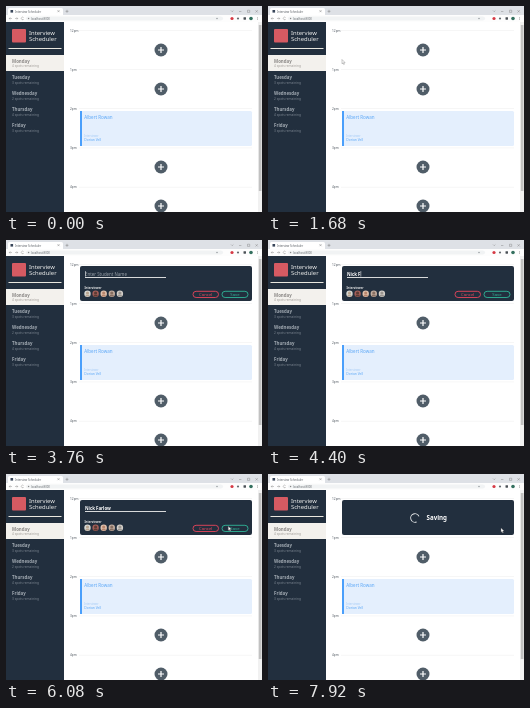
Write an HTML page that moves like this. It is 256 by 206 pixels and loops after 8 s.

```html
<!DOCTYPE html>
<html lang="en">
<head>
<meta charset="utf-8">
<title>Interview Scheduler</title>
<style>
html, body { margin: 0; width: 100%; height: 100%; overflow: hidden; background: #fff; }
svg { display: block; width: 100vw; height: 100vh; font-family: "Noto Sans", "Open Sans", sans-serif; }
</style>
</head>
<body>
<svg id="stage" viewBox="0 0 256 206" xmlns="http://www.w3.org/2000/svg"></svg>
<script>
const NS = "http://www.w3.org/2000/svg";
const stage = document.getElementById("stage");
const DARK = "#222f3e", BLUE = "#5ba7f7";

function add(parent, tag, attrs, text) {
  const el = document.createElementNS(NS, tag);
  for (const k in attrs) el.setAttribute(k, attrs[k]);
  if (text) el.textContent = text;
  parent.appendChild(el);
  return el;
}
const group = (parent = stage) => add(parent, "g", {});
const rect = (p, x, y, width, height, fill, rx = 0) => add(p, "rect", { x, y, width, height, fill, rx });
const dot = (p, cx, cy, r, fill) => add(p, "circle", { cx, cy, r, fill });
const line = (p, d, stroke, width = 0.6) =>
  add(p, "path", { d, stroke, "stroke-width": width, fill: "none" });
const label = (p, x, y, size, fill, str, weight = 400) =>
  add(p, "text", { x, y, "font-size": size, fill, "font-weight": weight }, str);
const show = (el, on) => el.setAttribute("visibility", on ? "visible" : "hidden");

function browser() {
  const g = group();
  rect(g, 0, 0, 256, 10, "#dee1e6");
  rect(g, 2, 2, 55, 9, "#fff", 1.5);
  rect(g, 4.5, 4, 2.6, 2.6, "#39465a");
  label(g, 9, 6.5, 2.8, "#5a5f65", "Interview Scheduler");
  line(g, "M51.5 4.2l2 2m0-2l-2 2", "#666", 0.4);
  line(g, "M59.5 5.3h3m-1.5-1.5v3", "#666", 0.4);
  line(g, "M225 4.5l1.2 1.2 1.2-1.2M233 5.5h2.4M241.5 4.2h2.2v2.2h-2.2zM249.5 4.2l2.3 2.3m0-2.3l-2.3 2.3", "#777", 0.4);
  rect(g, 0, 9, 256, 7, "#fdfdfd");
  line(g, "M6 12.5h-2.8l1.2-1.2m-1.2 1.2l1.2 1.2M9 12.5h2.8l-1.2-1.2m1.2 1.2l-1.2 1.2M17.6 11.6a1.3 1.3 0 1 0 .2 1.4", "#777", 0.4);
  rect(g, 20, 10.4, 197, 4.2, "#f1f3f4", 2.1);
  dot(g, 22.6, 12.5, 0.7, "#888");
  label(g, 25, 13.5, 2.8, "#666b70", "localhost:8000");
  dot(g, 211, 12.5, 0.8, "#9a9fa4");
  dot(g, 226, 12.5, 1.6, "#d63a45");
  dot(g, 232, 12.5, 1.1, "#666c72");
  rect(g, 237.5, 11.2, 2.5, 2.5, "#4b5157", 0.4);
  dot(g, 245, 12.5, 1.8, "#34705f");
  for (const y of [11.3, 12.5, 13.7]) dot(g, 251.5, y, 0.35, "#555");
  rect(g, 252, 16, 4, 190, "#f1f1f1");
  rect(g, 252.8, 19, 2.7, 166, "#c1c1c1");
}

function sidebar() {
  const g = group();
  rect(g, 0, 16, 58, 190, DARK);
  rect(g, 6, 23, 14, 13.5, "#d65a62", 1);
  label(g, 23, 29.2, 5.9, "#f3f3f1", "Interview");
  label(g, 23, 35.4, 5.9, "#f3f3f1", "Scheduler");
  rect(g, 2.5, 42, 53, 1, "#e9e7df");
  rect(g, 0, 49, 58, 16, "#f3f1ed");
  const days = [["Monday", 4], ["Tuesday", 3], ["Wednesday", 2], ["Thursday", 4], ["Friday", 3]];
  days.forEach(([name, spots], i) => {
    const y = 56.8 + i * 16.1;
    label(g, 6, y, 4.4, i ? "#a3abb3" : "#8b8886", name, 600);
    label(g, 6, y + 4.6, 3.2, i ? "#7c8691" : "#a09c98", spots + " spots remaining");
  });
}

function addButton(y) {
  const g = group();
  dot(g, 155, y, 6.5, "#505d68");
  line(g, `M152 ${y}h6m-3-3v6`, "#fff", 1.2);
  return g;
}

function booking() {
  const g = group();
  rect(g, 74, 105, 172, 35, "#e4effd", 1.5);
  rect(g, 74, 105, 2, 35, "#4a9ffb");
  label(g, 78.3, 113, 4.5, BLUE, "Albert Rowan");
  label(g, 78.3, 130.7, 2.7, "#a5cbf6", "Interviewer");
  label(g, 78.3, 135.3, 3.3, BLUE, "Dorian Vell");
}

function outlineButton(p, x, width, color, str) {
  add(p, "rect", { x, y: 51.3, width, height: 6.2, rx: 3.1, fill: "none", stroke: color, "stroke-width": 0.9 });
  label(p, x + width / 2, 56, 4.3, color, str, 500).setAttribute("text-anchor", "middle");
}

function bookingForm() {
  const g = group();
  rect(g, 74, 26, 172, 35, DARK, 2);
  const input = label(g, 79, 35.6, 4.4, "#fff", "");
  const caret = rect(g, 79, 31, 0.5, 5.6, "#fff");
  rect(g, 79, 37, 81, 1, "#d8dadb");
  label(g, 78.5, 48.6, 2.9, "#eceded", "Interviewer", 600);
  const faces = [["#b9a48f", "#d7d9d5"], ["#5c3c35", "#a55f59"], ["#b7856c", "#e0c2ae"], ["#876f62", "#c3aea0"], ["#99948f", "#d4d0ca"]];
  faces.forEach(([skin, back], i) => {
    const x = 81.5 + i * 8.1;
    dot(g, x, 53.7, 3.2, back);
    dot(g, x, 53, 1.6, skin);
    line(g, `M${x - 1.9} 55.6h3.8`, skin, 1.7);
  });
  outlineButton(g, 187, 25.5, "#e8465c", "Cancel");
  outlineButton(g, 216, 26, "#2fb598", "Save");
  return { g, input, caret };
}

function savingCard() {
  const g = group();
  rect(g, 74, 26, 172, 35, DARK, 2);
  const spinner = group(g);
  line(spinner, "M147 39.7a4.3 4.3 0 1 1-4.3 4.3", "#e9ebec", 0.9);
  label(g, 158.5, 46.2, 6.2, "#fff", "Saving", 700);
  return { g, spinner };
}

browser();
sidebar();
["12pm", "1pm", "2pm", "3pm", "4pm"].forEach((time, i) => {
  const y = 25.5 + i * 39.2;
  label(stage, 64, y, 3.2, "#555d65", time);
  rect(stage, 73, y - 1.4, 173, 0.5, "#ededed");
});
const firstSlot = addButton(44);
[83, 161, 200].forEach(addButton);
booking();
const form = bookingForm();
const saving = savingCard();
const pointer = add(stage, "path", {
  d: "M0 0v4.3l1-.9.7 1.6.7-.3-.7-1.6h1.4z",
  fill: "#fff", stroke: "#666", "stroke-width": 0.35
});

const LOOP = 8000, STEP = 80;
const OPEN = 2320, FOCUS = 3440, TYPE = 3920, SAVE = 6480;
const NAME = "Nick Farlow";
// time, x, y
const path = [
  [1200, 62, 84], [1600, 74, 53.5], [1760, 74, 53.5], [2160, 153, 43], [2400, 153, 43],
  [2560, 150.5, 43], [2800, 150.5, 43], [3280, 110, 33], [5360, 110, 33],
  [6240, 233, 54], [LOOP, 233, 54]
];

function pointAt(t) {
  const i = Math.max(1, path.findIndex(p => p[0] >= t));
  const [t0, x0, y0] = path[i - 1], [t1, x1, y1] = path[i];
  const k = Math.min(1, Math.max(0, (t - t0) / (t1 - t0)));
  const e = k * k * (3 - 2 * k);
  return [x0 + (x1 - x0) * e, y0 + (y1 - y0) * e];
}

function draw(t) {
  const editing = t >= OPEN && t < SAVE;
  show(firstSlot, t < OPEN);
  show(form.g, editing);
  show(saving.g, t >= SAVE);

  const count = Math.max(0, Math.min(NAME.length, Math.floor((t - TYPE) / 96) + 1));
  form.input.textContent = count ? NAME.slice(0, count) : "Enter Student Name";
  form.input.setAttribute("fill", count ? "#fff" : "#99a1a9");
  form.input.setAttribute("font-weight", count ? 600 : 400);
  const typing = t >= TYPE && t < TYPE + 1100;
  const blink = typing || (t - FOCUS) % 1040 < 520;
  show(form.caret, editing && t >= FOCUS && blink);
  if (editing) {
    form.caret.setAttribute("x", 79 + (count ? form.input.getComputedTextLength() + 0.2 : 0));
  }

  saving.spinner.setAttribute("transform", `rotate(${(t - SAVE) * 0.36} 147 44)`);
  const [x, y] = pointAt(t);
  pointer.setAttribute("transform", `translate(${x} ${y})`);
  show(pointer, t >= 1200 && (t < 3600 || t >= 5360));
}

const start = performance.now();
function tick() {
  const t = (performance.now() - start) % LOOP;
  draw(Math.floor(t / STEP) * STEP);
  requestAnimationFrame(tick);
}
tick();
</script>
</body>
</html>
```
